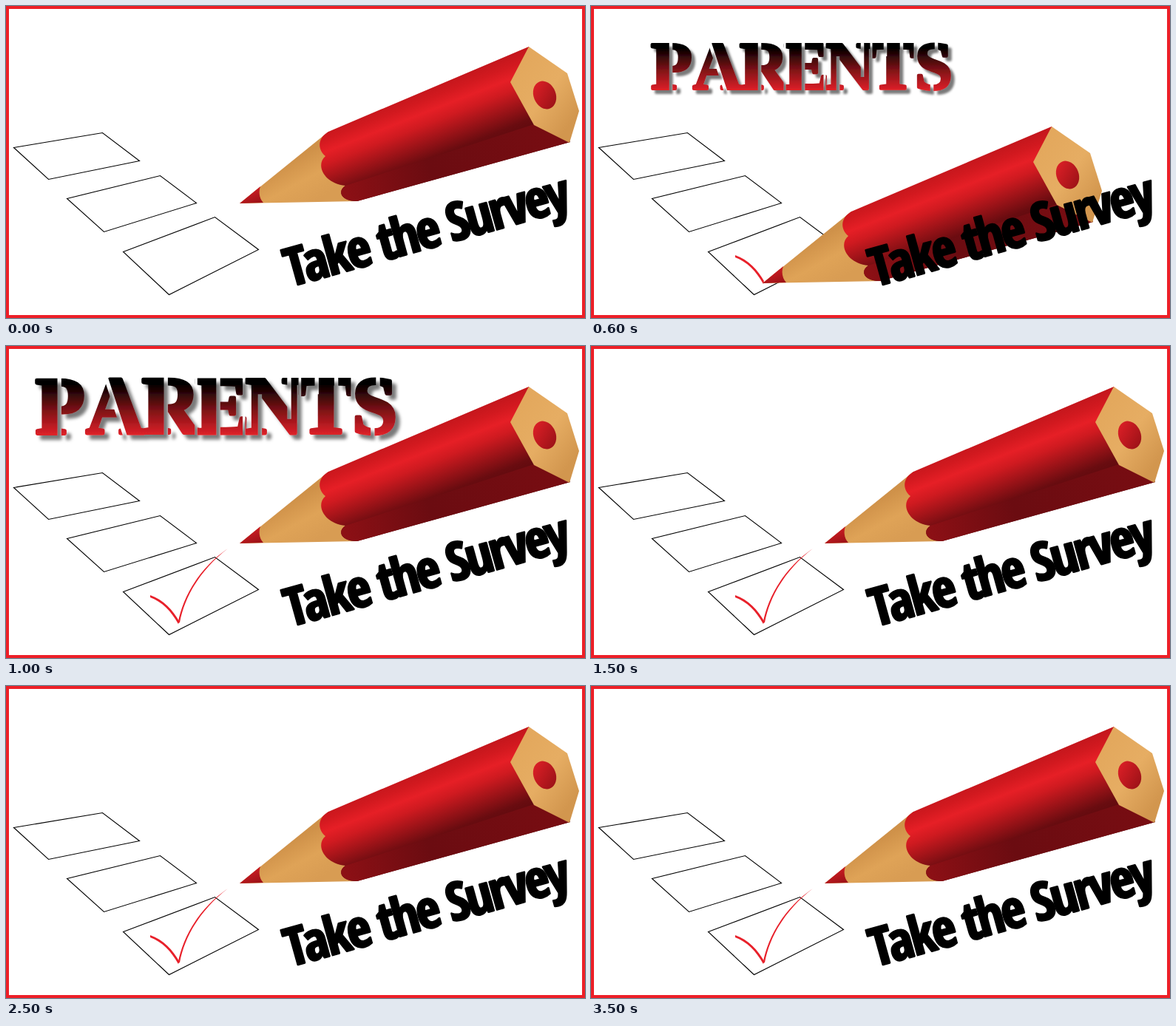
Recreate the animation shown at these times as an HTML page. Size 783 px wide and 422 px high, loop 4000 ms.

```html
<!DOCTYPE html>
<html lang="en">
<head>
<meta charset="utf-8">
<title>Take the Survey</title>
<style>
  html, body { margin: 0; width: 100%; height: 100%; overflow: hidden; background: #fff; }
  svg { display: block; width: 100vw; height: 100vh; }
  #headline text {
    font: bold 91px "Liberation Serif", "Times New Roman", serif;
    fill: url(#ink); stroke: url(#ink); stroke-width: 4; stroke-linejoin: round;
  }
  #slogan {
    font: 800 condensed 60px "Liberation Sans", sans-serif; letter-spacing: -.045em;
    stroke: #000; stroke-width: 2.8; stroke-linejoin: round;
  }
</style>
</head>
<body>
<svg viewBox="0 0 783 422">
  <defs>
    <linearGradient id="ink" gradientUnits="userSpaceOnUse" x1="0" y1="50" x2="0" y2="114">
      <stop offset=".1" stop-color="#000"/>
      <stop offset=".55" stop-color="#7a1115"/>
      <stop offset="1" stop-color="#df2129"/>
    </linearGradient>
    <linearGradient id="paint" gradientUnits="userSpaceOnUse" x1="563" y1="112" x2="604" y2="216">
      <stop offset="0" stop-color="#c3161c"/>
      <stop offset=".14" stop-color="#d2191f"/>
      <stop offset=".28" stop-color="#e61f26"/>
      <stop offset=".42" stop-color="#cf1a20"/>
      <stop offset=".62" stop-color="#9c1318"/>
      <stop offset=".82" stop-color="#690c10"/>
      <stop offset="1" stop-color="#5a090d"/>
    </linearGradient>
    <linearGradient id="underside" gradientUnits="userSpaceOnUse" x1="455" y1="255" x2="750" y2="175">
      <stop offset="0" stop-color="#8d1015"/>
      <stop offset=".4" stop-color="#6b0c11"/>
      <stop offset="1" stop-color="#780d12"/>
    </linearGradient>
    <linearGradient id="wood" gradientUnits="userSpaceOnUse" x1="375" y1="215" x2="405" y2="270">
      <stop offset="0" stop-color="#cf9149"/>
      <stop offset=".5" stop-color="#dfa357"/>
      <stop offset="1" stop-color="#d89c53"/>
    </linearGradient>
    <linearGradient id="butt" gradientUnits="userSpaceOnUse" x1="690" y1="90" x2="770" y2="150">
      <stop offset="0" stop-color="#e3a85d"/>
      <stop offset=".5" stop-color="#e6ad63"/>
      <stop offset="1" stop-color="#d2964e"/>
    </linearGradient>
    <linearGradient id="lead" x1="0" y1="0" x2=".6" y2="1">
      <stop offset="0" stop-color="#e32028"/>
      <stop offset="1" stop-color="#a01318"/>
    </linearGradient>
    <filter id="shadow" filterUnits="userSpaceOnUse" x="60" y="30" width="460" height="110">
      <feDropShadow dx="5" dy="5" stdDeviation="1.6" flood-color="#000" flood-opacity=".52"/>
    </filter>
    <mask id="stencil" maskUnits="userSpaceOnUse" x="60" y="30" width="460" height="110">
      <path fill="#fff" d="M60 30h460v110H60z"/>
      <path stroke="#000" stroke-width="4.5" d="M108 46v72M160 48L183 118M228 46v72M287 46v72
        M334 68v50M367 46v50M398 46v22M420 46v22M467 46v20M461 98v20"/>
      <path stroke="#000" stroke-width="3" d="M262 46v72M316 46v72M379 46v72M438 46v72"/>
    </mask>
  </defs>

  <rect width="783" height="422" fill="#fff"/>
  <path fill="none" stroke="#000" stroke-width="1.1" transform="translate(.5 .5)" d="M10 191L130 171L180 209L57 234Z
    M82 260L208 229L257 266L132 305ZM158 332L282 285L341 329L220 390Z"/>

  <g fill="#e8202a">
    <path id="tickDown" d="M195 337C213 343 226 358 234 372L233 376C223 358 211 346 195 340Z"/>
    <path id="tickUp" d="M232.5 375C239 338 263 299 300 274C264.500 301 241.500 338 235 374Z"/>
  </g>

  <g id="headline">
    <g filter="url(#shadow)"><g mask="url(#stencil)">
      <text x="81 138 201 261 317 378 438" y="112">PARENTS</text>
    </g></g>
  </g>

  <g id="pencil">
    <path fill="url(#wood)" d="M316 267L436 170L480 200L475 264Z"/>
    <path fill="url(#lead)" d="M316 267L344 244C341 252 343 261 348 266Z"/>
    <path fill="url(#paint)" d="M436 170L707 55L763 184L475 264C452 264 448 250 459 243
      C430 240 418 215 432 203C421 194 421 179 436 170Z"/>
    <path fill="url(#underside)" d="M459 243L714 160L763 184L475 264C452 264 448 250 459 243Z"/>
    <path fill="url(#butt)" d="M707 55L759 91L775 142L762 185L714 161L682 103Z"/>
    <ellipse cx="728.5" cy="120.5" rx="15" ry="19.500" transform="rotate(-22 728.5 120.5)" fill="url(#lead)"/>
  </g>

  <text id="slogan" transform="translate(388 381) rotate(-15.5)" x="-3" y="-2">Take the Survey</text>
  <rect x="2" y="2" width="779" height="418" fill="none" stroke="#ed1f27" stroke-width="4"/>
</svg>
<script>
  const LOOP = 4000;
  const SLOGAN_WIDTH = 394;
  const el = id => document.getElementById(id);
  const show = (id, on) => el(id).setAttribute("visibility", on ? "visible" : "hidden");

  // Use the narrowest bold face available, at the size that fills the line.
  function setSlogan() {
    const slogan = el("slogan");
    const widthIn = family => {
      slogan.style.fontFamily = `"${family}", "Liberation Sans", sans-serif`;
      return slogan.getComputedTextLength();
    };
    const families = ["Liberation Sans", "Open Sans", "Open Sans Condensed", "Noto Sans",
      "Noto Sans Condensed", "Roboto Condensed", "Liberation Sans Narrow"];
    const narrowest = families.reduce((a, b) => widthIn(b) < widthIn(a) ? b : a);
    slogan.style.fontSize = 60 * SLOGAN_WIDTH / widthIn(narrowest) + "px";
  }

  function pencilOffset(t) {
    if (t < 400 || t >= 1000) return [0, 0];
    if (t < 600) return [-122, 71];
    return t < 800 ? [-84, 108] : [-18, 8];
  }

  function draw(t) {
    el("pencil").setAttribute("transform", `translate(${pencilOffset(t)})`);
    show("tickDown", t >= 600);
    show("tickUp", t >= 800);

    // The headline grows in steps, then blinks every half second.
    const scale = t < 800 ? 1 : t < 1000 ? 1.085 : 1.2;
    el("headline").setAttribute("transform", `translate(287 82) scale(${scale}) translate(-287 -82)`);
    show("headline", t < 1000 ? t >= 200 : Math.floor(t / 500) % 2 === 0);
  }

  const start = performance.now();
  function tick() {
    draw((performance.now() - start) % LOOP);
    requestAnimationFrame(tick);
  }
  setSlogan();
  tick();
</script>
</body>
</html>
```
